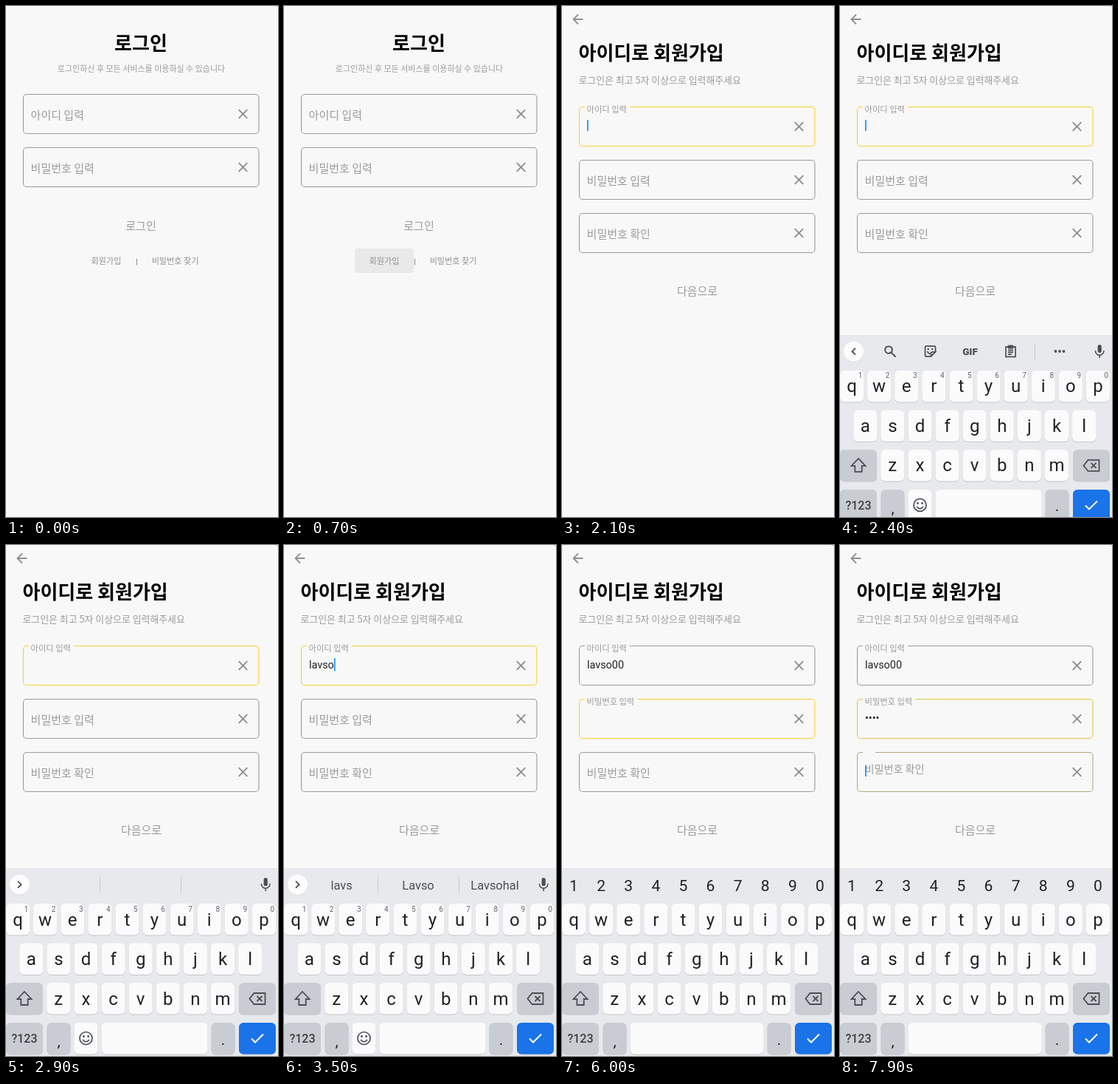
Recreate the animation shown at these times as an HTML page with a canvas. Size 369 px wide and 691 px high, loop 8000 ms.

```html
<!DOCTYPE html>
<html lang="ko">
<head>
<meta charset="utf-8">
<title>회원가입</title>
<style>
  html, body { margin: 0; width: 100%; height: 100%; overflow: hidden; background: #f8f8f8; }
  canvas { display: block; width: 369px; height: 691px; }
</style>
</head>
<body>
<canvas id="stage"></canvas>
<script>
const W = 369, H = 691, LOOP = 8000, TICK = 100;
const HANGUL = '"Noto Sans CJK KR", "Noto Sans CJK", "Noto Sans KR", sans-serif';
const LATIN = 'Roboto, sans-serif';
const PAPER = '#f8f8f8', GREY = '#9b9b9b', INK = '#202124', ICON = '#4b4f54';
const USER_ID = 'lavso00', GUESS = 'Lavsohal';
const FOCUS = [1900, 5700, 7900];
const ID_KEYS = [3100, 3200, 3300, 3400, 3500, 4300, 4500];
const PW_KEYS = [6200, 6300, 6400, 6500];
const CARET_ON = [
  [[1900, 2500], [3100, 4100], [4300, 5000], [5500, 5700]],
  [[5700, 6000], [6200, 7000], [7400, 7900]],
  [[7900, 8000]]
];

const canvas = document.getElementById('stage');
const ctx = canvas.getContext('2d');
const dpr = window.devicePixelRatio || 1;
canvas.width = Math.round(W * dpr);
canvas.height = Math.round(H * dpr);

const countUpTo = (times, t) => times.filter(at => at <= t).length;
const within = (spans, t) => spans.some(([a, b]) => t >= a && t < b);

// Label and border ease over 167 ms after a field gains or loses focus.
function eased(t, at) {
  const p = Math.min(1, Math.max(0, (t - at + 53) / 167));
  return t < at ? 0 : p * p * (3 - 2 * p);
}

function mix(a, b, p) {
  return `rgb(${a.map((v, i) => Math.round(v + (b[i] - v) * p)).join(',')})`;
}

function text(str, x, baseline, size, color, { font = LATIN, weight = 400, align = 'left' } = {}) {
  ctx.font = `${weight} ${size}px ${font}`;
  ctx.textAlign = align;
  ctx.fillStyle = color;
  ctx.fillText(str, x, baseline);
}

// Places Korean text by the middle of its glyphs.
function korean(str, x, middle, size, color, align = 'left', weight = 400) {
  text(str, x, middle + size * 0.37, size, color, { font: HANGUL, weight, align });
}

function roundRect(x, y, w, h, r, color) {
  ctx.beginPath();
  ctx.roundRect(x, y, w, h, r);
  ctx.fillStyle = color;
  ctx.fill();
}

function disc(x, y, r, color) {
  ctx.beginPath();
  ctx.arc(x, y, r, 0, Math.PI * 2);
  ctx.fillStyle = color;
  ctx.fill();
}

// Strokes an SVG path around a centre point.
function icon(d, x, y, color, width = 1.9, fill) {
  ctx.save();
  ctx.translate(x, y);
  const path = new Path2D(d);
  if (fill) {
    ctx.fillStyle = color;
    ctx.fill(path);
  } else {
    ctx.strokeStyle = color;
    ctx.lineWidth = width;
    ctx.stroke(path);
  }
  ctx.restore();
}

function field(top, label, { float = 0, focus = 0, value = '', caret = false } = {}) {
  const l = 23.5, r = 343, b = top + 53, rad = 4.5;
  ctx.font = `400 15px ${HANGUL}`;
  const gap = float * (ctx.measureText(label).width * 0.75 + 6.5);

  ctx.beginPath();
  ctx.moveTo(31 + gap, top);
  ctx.arcTo(r, top, r, b, rad);
  ctx.arcTo(r, b, l, b, rad);
  ctx.arcTo(l, b, l, top, rad);
  ctx.arcTo(l, top, r, top, rad);
  ctx.lineTo(31, top);
  ctx.strokeStyle = mix([155, 155, 155], [251, 207, 52], focus);
  ctx.lineWidth = 1.1;
  ctx.stroke();

  korean(label, 33.6, top + 28 - 25 * float, 15 * (1 - 0.25 * float), GREY);
  icon('M-5.8-5.8L5.8 5.8M5.8-5.8L-5.8 5.8', 321.5, top + 26.5, '#8b8b8b', 1.8);
  text(value, 34, top + 30.5, 14.4, '#222');
  if (caret) {
    const x = 34 + (value ? ctx.measureText(value).width : 0);
    ctx.fillStyle = '#2196f3';
    if (value) ctx.fillRect(x, top + 16.5, 1.8, 17.5);
    else ctx.fillRect(x, top + 17.5, 1.8, 15);
  }
}

function paper() {
  ctx.fillStyle = PAPER;
  ctx.fillRect(0, 0, W, H);
}

function loginPage(t) {
  paper();
  korean('로그인', 183, 50, 26, '#000', 'center', 700);
  korean('로그인하신 후 모든 서비스를 이용하실 수 있습니다', 183.5, 85, 11, GREY, 'center');
  field(119.5, '아이디 입력');
  field(191.5, '비밀번호 입력');
  korean('로그인', 183, 297, 15, GREY, 'center');
  if (t >= 700) roundRect(96, 328, 80, 33, 4, 'rgba(0,0,0,0.06)');
  else if (t >= 500) disc(130.5, 343, 3.8, 'rgba(0,0,0,0.06)');
  korean('회원가입', 136, 345, 11.1, '#909090', 'center');
  korean('비밀번호 찾기', 229.5, 345, 11.1, '#909090', 'center');
  ctx.fillStyle = '#909090';
  ctx.fillRect(177, 341.5, 1, 9);
}

function joinPage(t) {
  paper();
  icon('M6.9 0H-6M.5-6.5L-6 0L.5 6.5', 21.5, 18, '#8f8f8f', 1.8);
  korean('아이디로 회원가입', 22.5, 63, 26, '#000', 'left', 700);
  korean('로그인은 최고 5자 이상으로 입력해주세요', 22.5, 100, 12.9, GREY);
  const values = [
    USER_ID.slice(0, countUpTo(ID_KEYS, t)),
    '•'.repeat(countUpTo(PW_KEYS, t)),
    ''
  ];
  ['아이디 입력', '비밀번호 입력', '비밀번호 확인'].forEach((label, i) => {
    const float = eased(t, FOCUS[i]);
    const blur = i < 2 ? eased(t, FOCUS[i + 1]) : 0;
    field(136.5 + 72 * i, label, {
      float, focus: float - blur, value: values[i], caret: within(CARET_ON[i], t)
    });
  });
  korean('다음으로', 183.5, 385, 15, GREY, 'center');
}

function key(x, y, w, color = '#fbfbfc') {
  roundRect(x, y + 1, w, 42.5, 6, '#c3c6cb');
  roundRect(x, y, w, 42.5, 6, color);
}

function divider(x) {
  ctx.fillStyle = '#c6c9cd';
  ctx.fillRect(x, 449, 1, 21);
}

function stripEnds(chevron) {
  disc(18.5, 460, 13.7, '#d9dbde');
  disc(18.5, 459.2, 13.5, '#fdfdfd');
  icon(chevron, 18.5, 459.2, ICON);
  ctx.save();
  ctx.lineCap = 'round';
  roundRect(349.6, 450, 5.2, 11, 2.6, ICON);
  icon('M-5.7-1A5.7 5.7 0 0 0 5.7-1M0 5V8', 352.2, 459.5, ICON, 1.6);
  ctx.restore();
}

function toolbar() {
  stripEnds('M2.5-4.5L-2 0L2.5 4.5');
  icon('M2.8-2A4.8 4.8 0 1 1-6.8-2A4.8 4.8 0 1 1 2.8-2M1.5 1.6L7.5 7.5', 68, 459, ICON, 2);
  icon('M7 1V-5Q7-7 5-7H-5Q-7-7-7-5V5Q-7 7-5 7H1L7 1H3Q1 1 1 3V7M-4 0Q-2.5 3.5 0 3.2', 122.5, 459, ICON, 1.7);
  disc(119.7, 456, 1.2, ICON);
  disc(125.2, 456, 1.2, ICON);
  text('GIF', 176.5, 464, 13.5, ICON, { weight: 900, align: 'center' });
  icon('M-6.5-6H6.5V7.5H-6.5ZM-3.5-1.5H3.5M-3.5 1.2H3.5M-3.5 4H1.5', 231.5, 459, ICON, 1.7);
  roundRect(227.5, 450.5, 8, 5, 1.5, ICON);
  divider(264);
  for (const x of [292.5, 298, 303.5]) disc(x, 459, 1.9, ICON);
}

function suggestions(t) {
  stripEnds('M-2.5-4.5L2 0L-2.5 4.5');
  divider(127);
  divider(237);
  const n = countUpTo(ID_KEYS, t - TICK);
  if (t < 3100) return;
  const lead = USER_ID.slice(0, n);
  const words = [lead, GUESS.slice(0, Math.min(5, n + 1)), t >= 3400 ? GUESS : ''];
  words.forEach((word, i) =>
    text(word, 78 + 104 * i, 465.5, 16.4, ICON, { align: 'center' }));
}

function keyboard(t) {
  const secret = t >= 5800, center = { align: 'center' };
  const dark = '#c9cdd3', pitch = 37.1;
  ctx.save();
  ctx.translate(0, 254 * Math.pow(Math.max(0, 1 - (t - 2200) / 400), 5));
  ctx.fillStyle = '#e7e9ec';
  ctx.fillRect(0, 437, W, 260);

  const digits = [...'1234567890'];
  if (secret) digits.forEach((d, i) => text(d, 16 + pitch * i, 467.5, 21, INK, center));
  else if (t >= 2900 && t < 4600) suggestions(t);
  else toolbar();

  [['qwertyuiop', 16, 485], ['asdfghjkl', 34.3, 538.5], ['zxcvbnm', 71.3, 592]].forEach(([row, x0, y]) => {
    [...row].forEach((letter, i) => {
      const x = x0 + pitch * i;
      key(x - 16, y, 32);
      text(letter, x, y + 29.5, 24, INK, center);
      if (!secret && y === 485) text(digits[i], x + 11.5, 495.5, 10, '#5f6368', center);
    });
  });

  key(0, 592, 50, dark);
  icon('M0-9.5L9.5.5H4.7V8.5H-4.7V.5H-9.5Z', 25, 613.5, ICON, 1.8);
  key(316, 592, 50, dark);
  icon('M-4.5-7.5H10.5V7.5H-4.5L-10.5 0ZM-.5-3.5L6.5 3.5M6.5-3.5L-.5 3.5', 341, 613.5, ICON, 1.8);

  const y = 646;
  key(0, y, 50, dark);
  text('?123', 25, 673, 16, '#3c4043', { weight: 500, align: 'center' });
  key(55.5, y, 32, dark);
  text(',', 71.5, 678, 21, INK, center);
  if (secret) {
    key(92.5, y, 181);
  } else {
    key(92.5, y, 32);
    icon('M8.5 0A8.5 8.5 0 1 1-8.5 0A8.5 8.5 0 1 1 8.5 0M-4.5 2Q0 7.5 4.5 2', 108.5, 667, ICON, 1.7);
    disc(105.4, 664.5, 1.4, ICON);
    disc(111.6, 664.5, 1.4, ICON);
    key(129.5, y, 144);
  }
  key(278.5, y, 32, dark);
  text('.', 294.5, 675.5, 21, INK, center);
  key(316, y, 50, '#1a73e8');
  icon('M-8 .5L-3 5.5L8-5.5', 341, 667, '#fff', 2);
  ctx.restore();
}

function draw(t) {
  ctx.setTransform(dpr, 0, 0, dpr, 0, 0);
  ctx.globalAlpha = 1;
  if (t < 1000) loginPage(t);
  if (t >= 900) {
    const entering = t < 1000;
    ctx.save();
    if (entering) {
      ctx.globalAlpha = 0.5;
      ctx.translate(0, 20);
    }
    joinPage(t);
    ctx.restore();
  }
  if (t >= 2300) keyboard(t);
  icon('M-5 0H0V2.5Q-2 .6-5 0Z', W, 0, '#e2e2e2', 0, true);
}

// The screen refreshes ten times a second.
const start = performance.now();
function frame() {
  const t = (performance.now() - start) % LOOP;
  draw(Math.floor(t / TICK) * TICK);
  requestAnimationFrame(frame);
}
frame();
</script>
</body>
</html>
```
